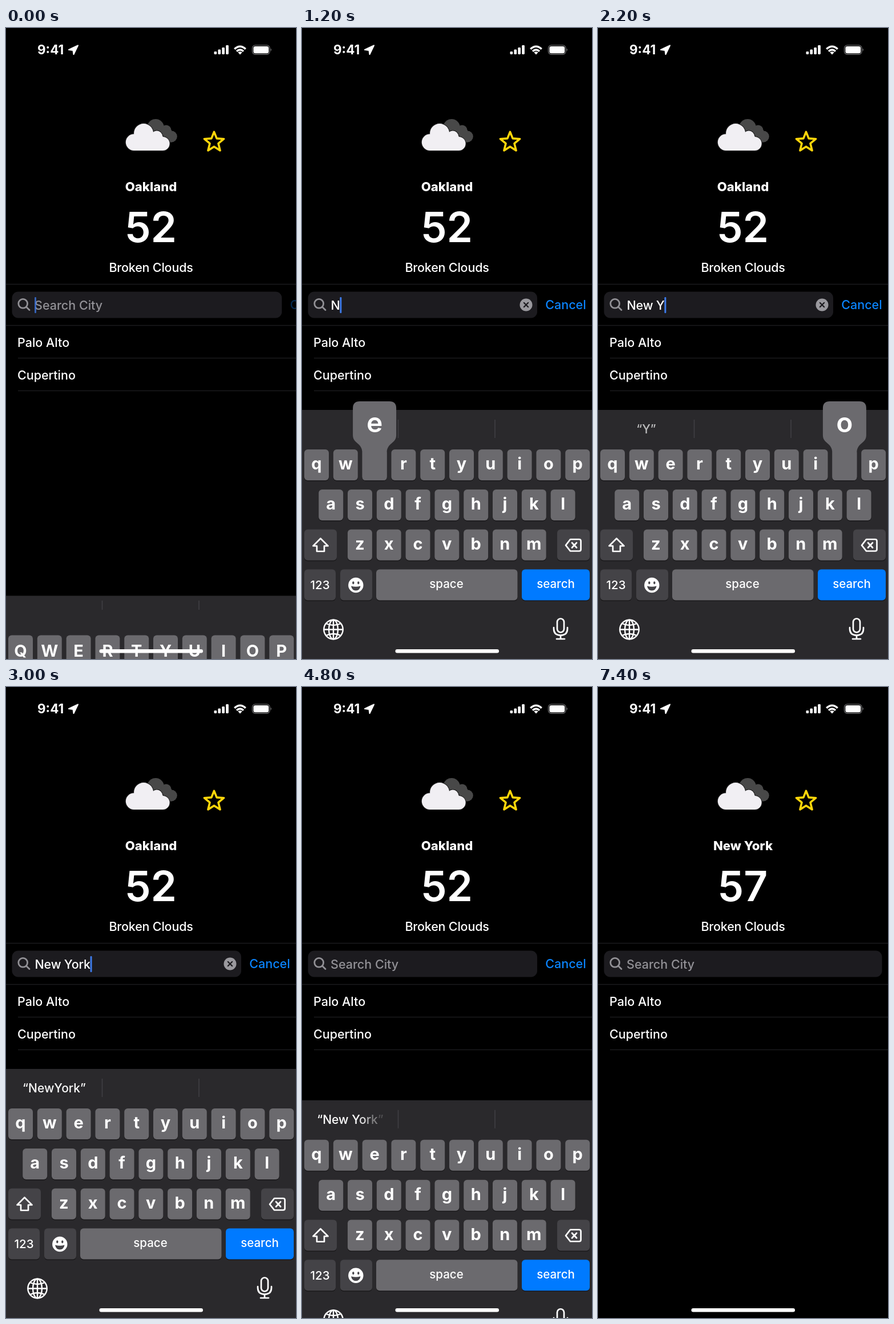
Write an HTML page that moves like this. It is 508 px wide and 1102 px high and loops after 8 s.

```html
<!DOCTYPE html>
<html lang="en">
<head>
<meta charset="utf-8">
<title>City weather search</title>
<style>
  html, body { margin: 0; width: 100%; height: 100%; overflow: hidden; background: #000; }
  svg { display: block; width: 508px; height: 1102px; }
  text { font: 500 21.5px Inter, "Open Sans", sans-serif; fill: #fff; white-space: pre; }
  .mid { text-anchor: middle; }
  .line { fill: none; stroke: #fff; stroke-width: 2.7; stroke-linecap: round; stroke-linejoin: round; }
  .rule { stroke: #1b1b1d; stroke-width: 1.3; }
  #city { font-weight: 800; font-size: 22.1px; }
  #temp { font-weight: 600; font-size: 73px; }
  #sky { letter-spacing: -.2px; }
  #clock { font-weight: 700; font-size: 22.5px; }
  #typed { letter-spacing: -.2px; }
  #cancel { fill: #0a84ff; }
  .key { font-weight: 650; font-size: 29px; }
  .label { font-size: 20.5px; }
  #guess { font-size: 21px; }
  #bubble text { font-weight: 600; font-size: 48px; }
</style>
</head>
<body>
<svg id="stage" viewBox="0 0 508 1102">
  <rect width="508" height="1102"/>

  <text id="clock" x="55" y="46">9:41</text>
  <path d="M126 30.5 L110 38 L117.5 39 L118.5 46 Z" fill="#fff" stroke="#fff" stroke-width="2" stroke-linejoin="round"/>
  <g id="bars" fill="#fff"></g>
  <g fill="none" stroke="#fff" stroke-width="3.4">
    <path d="M400.3 36.8 Q410 27.8 419.7 36.8"/>
    <path d="M404 40.7 Q410 35.3 416 40.7"/>
    <path d="M406.3 42.6 Q410 39.8 413.7 42.6 L410 46.5 Z" fill="#fff" stroke="none"/>
  </g>
  <rect x="431.5" y="30.2" width="30.5" height="15.8" rx="5" fill="none" stroke="#6c6c6e" stroke-width="1.3"/>
  <rect x="433.4" y="32" width="26.8" height="12.2" rx="3.3" fill="#fff"/>
  <path d="M463.7 35.5 Q466.3 38 463.7 40.5 Z" fill="#7a7a7c"/>

  <g fill="#484848">
    <circle cx="262" cy="174" r="15"/><circle cx="280.5" cy="178.5" r="9"/>
    <circle cx="289.8" cy="189.5" r="10"/><rect x="260" y="178" width="30" height="21.5"/>
  </g>
  <g id="cloud" fill="#f1eff3" transform="translate(-.4 -.4)"></g>
  <path id="star" fill="none" stroke="#ffd60a" stroke-width="3.6" stroke-linejoin="round"/>

  <text id="city" class="mid" x="254" y="285"></text>
  <text id="temp" class="mid" x="254" y="373.6"></text>
  <text id="sky" class="mid" x="254" y="425.5">Broken Clouds</text>

  <path class="rule" d="M0 447.5H508M0 519.5H508M21 576.5H508M21 633.5H508"/>
  <text x="20" y="556.5">Palo Alto</text>
  <text x="20" y="613.5">Cupertino</text>

  <rect id="field" x="10.5" y="460.5" height="46" rx="11" fill="#1c1b1f"/>
  <g fill="none" stroke="#929196" stroke-width="2.8" stroke-linecap="round">
    <circle cx="29.7" cy="481.3" r="7.9"/><path d="M35.6 487.2L41 492.5"/>
  </g>
  <text id="hint" x="50" y="492" style="fill:#929196">Search City</text>
  <text id="typed" x="50.5" y="492"></text>
  <rect id="caret" y="470" width="3" height="28" rx="1.3" fill="#3e7bea"/>
  <g id="clear">
    <circle cx="392.5" cy="483.5" r="11" fill="#9a999e"/>
    <path d="M388.8 479.8l7.4 7.4m0-7.4l-7.4 7.4" stroke="#1c1b1f" stroke-width="2.2" stroke-linecap="round"/>
  </g>
  <text id="cancel" y="490.5">Cancel</text>

  <g id="board">
    <rect y="667" width="508" height="440" fill="#2a292c"/>
    <path id="split" d="M168.5 0V32M338 0V32" stroke="#434246" stroke-width="1.4"/>
    <text id="guess" class="mid" x="84.5" y="708"></text>
    <g id="keys"></g>
    <path id="shift" class="line" d="M32.5 891.5L45.5 904.5H39V914H26V904.5H19.5Z"/>
    <path class="line" d="M470 893H485.5Q488.5 893 488.5 896V910.5Q488.5 913.5 485.5 913.5H470L462 903.3Z"/>
    <path class="line" d="M473 899l8 8.500m0-8.500l-8 8.500"/>
    <circle cx="94.3" cy="973" r="13.2" fill="#fff"/>
    <g fill="#444347">
      <ellipse cx="89.8" cy="969" rx="1.7" ry="2.4"/><ellipse cx="98.8" cy="969" rx="1.7" ry="2.4"/>
      <path d="M86 974.5Q94.3 977 102.6 974.5Q101 982.5 94.3 982.5Q87.6 982.5 86 974.5Z"/>
    </g>
    <g class="line" style="stroke-width:2.4">
      <circle cx="55" cy="1050.5" r="16.7"/><ellipse cx="55" cy="1050.5" rx="8" ry="16.7"/>
      <path d="M55 1034V1067M38.5 1050.5H71.5M42 1040Q55 1046 68 1040M42 1061Q55 1055 68 1061"/>
    </g>
    <g class="line">
      <rect x="447" y="1031.5" width="12" height="24" rx="6"/>
      <path d="M441 1047V1049Q441 1060.5 453 1060.5T465 1049V1047M453 1060.5V1066.5M446 1067H460"/>
    </g>
    <g id="bubble">
      <path d="M-38 -72Q-38 -84 -26 -84H26Q38 -84 38 -72V-25C38 -10 21.5 -12 21.5 6V48Q21.5 54 15.5 54H-15.5Q-21.5 54 -21.5 48V6C-21.5 -12 -38 -10 -38 -25Z" fill="#6b6a6e"/>
      <text class="mid" y="-30.5"></text>
    </g>
  </g>
  <rect x="163.5" y="1085" width="181.5" height="6.5" rx="3.25" fill="#fff"/>
</svg>

<script>
const LOOP = 8000, STEP = 100;
const $ = id => document.getElementById(id);
const set = (el, attrs) => { for (const k in attrs) el.setAttribute(k, attrs[k]); };
const show = (el, on) => { el.style.opacity = Number(on); };

// Static parts
$("bars").innerHTML = [5, 8.5, 12, 16].map((h, i) =>
  `<rect x="${364.5 + i * 6.9}" y="${46 - h}" width="4.7" height="${h}" rx="1.4"/>`).join("");

const puffs = '<circle cx="241.5" cy="184.5" r="17"/><circle cx="264.5" cy="190" r="10"/>' +
  '<circle cx="224.5" cy="200" r="14.3"/><circle cx="275" cy="202.5" r="12"/>' +
  '<rect x="224" y="189" width="51" height="25.4"/>';
$("cloud").innerHTML = `<g stroke="#1c1c1c" stroke-width="2">${puffs}</g>${puffs}`;

set($("star"), { d: "M" + Array.from({ length: 10 }, (_, i) => {
  const r = i % 2 ? 7.9 : 18, a = i * Math.PI / 5;
  return `${(364.5 + r * Math.sin(a)).toFixed(2)} ${(199.3 - r * Math.cos(a)).toFixed(2)}`;
}).join("L") + "Z" });

// Keyboard
const LIGHT = "#6b6a6e", DARK = "#444347", BLUE = "#007aff";
const ROWS = [736, 805.9, 875.8, 945.6];
const spots = {};
const cap = (x, row, w, fill, id = "") =>
  `<rect x="${x}" y="${ROWS[row] + 1.5}" width="${w}" height="54" rx="6" fill="#1a191b"/>` +
  `<rect id="${id}" x="${x}" y="${ROWS[row]}" width="${w}" height="54" rx="6" fill="${fill}"/>`;
const label = (x, y, s) => `<text class="label mid" x="${x}" y="${y}">${s}</text>`;

let html = "";
[["qwertyuiop", 4], ["asdfghjkl", 29.2], ["zxcvbnm", 79.9]].forEach(([row, left], r) => {
  [...row].forEach((c, i) => {
    const x = left + i * 50.8;
    spots[c] = { x: x + 21.5, y: ROWS[r] };
    html += cap(x, r, 43, LIGHT) + `<text id="k-${c}" class="key mid" x="${x + 21.5}"></text>`;
  });
});
html += cap(4, 2, 57, DARK, "shiftKey") + cap(447, 2, 57, DARK) +
  cap(4, 3, 55, DARK) + cap(67, 3, 56, DARK) +
  cap(130, 3, 247.5, LIGHT, "spaceKey") + cap(385, 3, 119, BLUE, "goKey") +
  label(31.5, 980, "123") + label(253, 978, "space") + label(444.5, 978, "search");
$("keys").innerHTML = html;

// Timed steps: [start, value]
const typed = [[0, ""], [1100, "N"], [1400, "Ne"], [1700, "New"], [1900, "New "], [2100, "New Y"],
  [2400, "New Yo"], [2600, "New Yor"], [2800, "New York"], [4700, ""]];
const guesses = [[0, ""], [1400, "Ne"], [1600, "New"], [1900, ""], [2100, "Y"],
  [2400, "Yo"], [2600, "Yor"], [2800, "NewYork"], [3200, "New York"], [5300, ""]];
const presses = [[0, ""], [900, "n"], [1100, ""], [1200, "e"], [1400, ""], [1500, "w"], [1700, ""],
  [1800, " "], [1900, ""], [2000, "y"], [2100, ""], [2200, "o"], [2400, ""], [2500, "r"],
  [2600, "k"], [2800, ""], [4500, "go"], [4700, ""]];
const caret = [[0, .75], [100, 1], [600, .45], [700, 0], [900, 1], [3600, .4], [3700, 0],
  [3900, .5], [4000, 1], [4700, 0]];
const at = (steps, t) => steps.filter(s => s[0] <= t).pop();

// Critically damped approach from 0 to 1
const spring = ms => {
  const k = Math.max(0, ms) * .018;
  return 1 - (1 + k) * Math.exp(-k);
};

function draw(t) {
  const found = t >= 5100;
  $("city").textContent = found ? "New York" : "Oakland";
  $("temp").textContent = found ? "57" : "52";

  const slide = t < 7200 ? 85.5 * (1 - spring(t + 40.7)) : 85.5;
  set($("field"), { width: 401.5 + slide });
  set($("cancel"), { x: 426.3 + slide });
  show($("cancel"), t >= 7200 ? 0 : Math.min(1, .3 + t / 400));

  const word = at(typed, t)[1];
  $("typed").textContent = word;
  show($("hint"), !word);
  show($("clear"), !!word);
  set($("caret"), { x: word ? 50.3 + $("typed").getComputedTextLength() : 50 });
  show($("caret"), at(caret, t)[1]);

  const drop = t < 4766 ? 435 * (1 - spring(t + 54)) : 435 * spring(t - 4766);
  set($("board"), { transform: `translate(0 ${drop.toFixed(2)})` });
  const grow = Math.min(1, .5 + t / 400);
  set($("split"), { transform: `translate(0 ${667 + 17 * grow}) scale(1 ${grow})` });

  const [since, guess] = at(guesses, t);
  const shown = guess && `“${guess}”`;
  const fading = t >= 4800;
  $("guess").innerHTML = [...shown].map((c, i) => {
    const o = fading ? Math.max(0, Math.min(1, (9.8 - i) / 4.5 - (t - 4800) / 200)) : 1;
    return `<tspan fill-opacity="${o.toFixed(2)}">${c}</tspan>`;
  }).join("");
  show($("guess"), Math.min(1, .4 + (t - since) / 350));

  const upper = t < 1100 || (t >= 1900 && t < 2100);
  const press = at(presses, t)[1];
  for (const c in spots) {
    const el = $("k-" + c);
    el.textContent = upper ? c.toUpperCase() : c;
    set(el, { y: spots[c].y + (upper ? 37.5 : 35) });
    show(el, c !== press);
  }
  set($("shiftKey"), { fill: upper ? "#d4d3d7" : DARK });
  set($("shift"), { style: upper ? "fill:#1c1b1e;stroke:#1c1b1e" : "" });
  set($("spaceKey"), { fill: press === " " ? DARK : LIGHT });
  set($("goKey"), { fill: press === "go" ? LIGHT : BLUE });

  const spot = spots[press];
  show($("bubble"), !!spot);
  if (spot) {
    set($("bubble"), { transform: `translate(${spot.x} ${spot.y})` });
    $("bubble").lastElementChild.textContent = upper ? press.toUpperCase() : press;
  }
}

const start = performance.now();
function tick() {
  const t = (performance.now() - start) % LOOP;
  draw(Math.floor(t / STEP) * STEP);
  requestAnimationFrame(tick);
}
tick();
</script>
</body>
</html>
```
